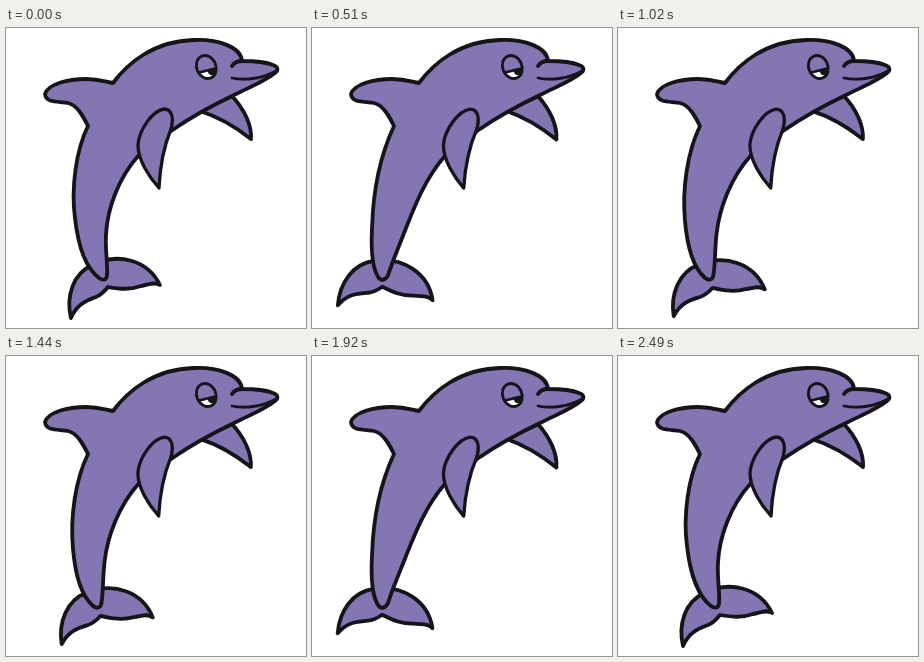
These frames come from a looping animation (300 by 300 pixels, 2.52 s). An HTML page:

```html
<!DOCTYPE html>
<html lang="en">
<head>
<meta charset="utf-8">
<title>Dolphin</title>
<style>
  html, body { margin: 0; width: 100%; height: 100%; overflow: hidden; background: #fff; }
  svg { display: block; width: 100vw; height: 100vh; }
  .ink { fill: #8475b3; stroke: #151419; stroke-width: 3.8; stroke-linejoin: round; stroke-linecap: round; }
  .line { fill: none; }
  .thin { stroke-width: 2.8; }
</style>
</head>
<body>
<svg viewBox="0 0 300 300">
  <defs>
    <clipPath id="eye"><ellipse cx="200.3" cy="39" rx="9.6" ry="11.8" transform="rotate(-24 200.3 39)"/></clipPath>
  </defs>
  <path id="farFin" class="ink" d="M194 83 C213 89 231 100 245 111 C246 97 238 81 226 68 Z"/>
  <path id="fluke" class="ink" d="M65 290 C60 268 67 246 86 237 C112 224 142 232 154 257
    C148 253 142 257 135 258 C124 262 114 261 102 259 C98 264 95 267 90 269 C80 273 71 276 65 290 Z"/>
  <path id="body" class="ink"/>
  <path class="ink line" d="M226 38 C228 35 232 33 236 33"/>
  <path class="ink line thin" d="M226 50 C240 53 258 50 270 43"/>
  <g clip-path="url(#eye)">
    <rect x="185" y="22" width="30" height="34" fill="#fff"/>
    <circle cx="206" cy="43" r="4.2" fill="#151419"/>
    <path class="ink thin" d="M180 20 H220 V38 L191 45 L180 48 Z"/>
  </g>
  <ellipse class="ink line thin" cx="200.3" cy="39" rx="9.6" ry="11.8" transform="rotate(-24 200.3 39)"/>
  <path id="flipper" class="ink" style="stroke-width: 3.3" d="M153 160 C143 149 132 132 132 117 C133 102 146 83 158 81 C166 81 168 90 165 101 C158 118 154 138 153 160 Z"/>
</svg>
<script>
  const FRAME = 30, CYCLE = 42, SWING = 17.4;
  const TORSO = 'M82 98 C77 88 71 77 62 75 C54 73 40 76 39 66 C42 56 62 51 80 51 ' +
    'C94 51 100 54 107 55 C121 36 147 13 188 12 C212 11 235 19 236 33 ' +
    'C247 33 260 34 267 37 C273 39 272 43 269 45 C259 53 244 59 230 66 C207 77 185 89 165 103 ';
  const TAIL_RIGHT = 'L133 127 C112 150 101 182 100 207 C99 222 102 236 101 247 ' +
    'C101 252 97 253 93 250 C80 240 72 217 69 190 C65 160 70 122 82 98 Z';
  const TAIL_LEFT = 'L132 129 C113 151 102 180 94 200 C89 213 82 229 77 244 ' +
    'C75 252 69 254 66 249 C59 238 59 218 60 200 C61 165 67 130 82 98 Z';
  const el = id => document.getElementById(id);
  const turn = (id, angle, x, y) => el(id).setAttribute('transform', `rotate(${angle} ${x} ${y})`);

  // Blends two paths that share the same commands.
  function mix(from, to, k) {
    const ends = to.match(/\d+/g);
    let i = 0;
    return from.replace(/\d+/g, n => (+n + (ends[i++] - n) * k).toFixed(2));
  }

  // 0 = tail right, 1 = tail left, with a short rest on the left.
  function swing(time) {
    const step = (Math.floor(time / FRAME) + 1) % CYCLE;
    const p = Math.min(1, Math.min(step, CYCLE - step) / 19.5);
    const a = p ** 2.1, b = (1 - p) ** 2.1;
    return a / (a + b);
  }

  function draw(time) {
    const s = swing(time);
    el('body').setAttribute('d', TORSO + mix(TAIL_RIGHT, TAIL_LEFT, s));
    turn('fluke', SWING * s, 87, 155);
    turn('flipper', s, 150, 85);
    turn('farFin', s, 212, 75);
  }

  const start = performance.now();
  function loop() {
    draw(performance.now() - start);
    requestAnimationFrame(loop);
  }
  loop();
</script>
</body>
</html>
```
